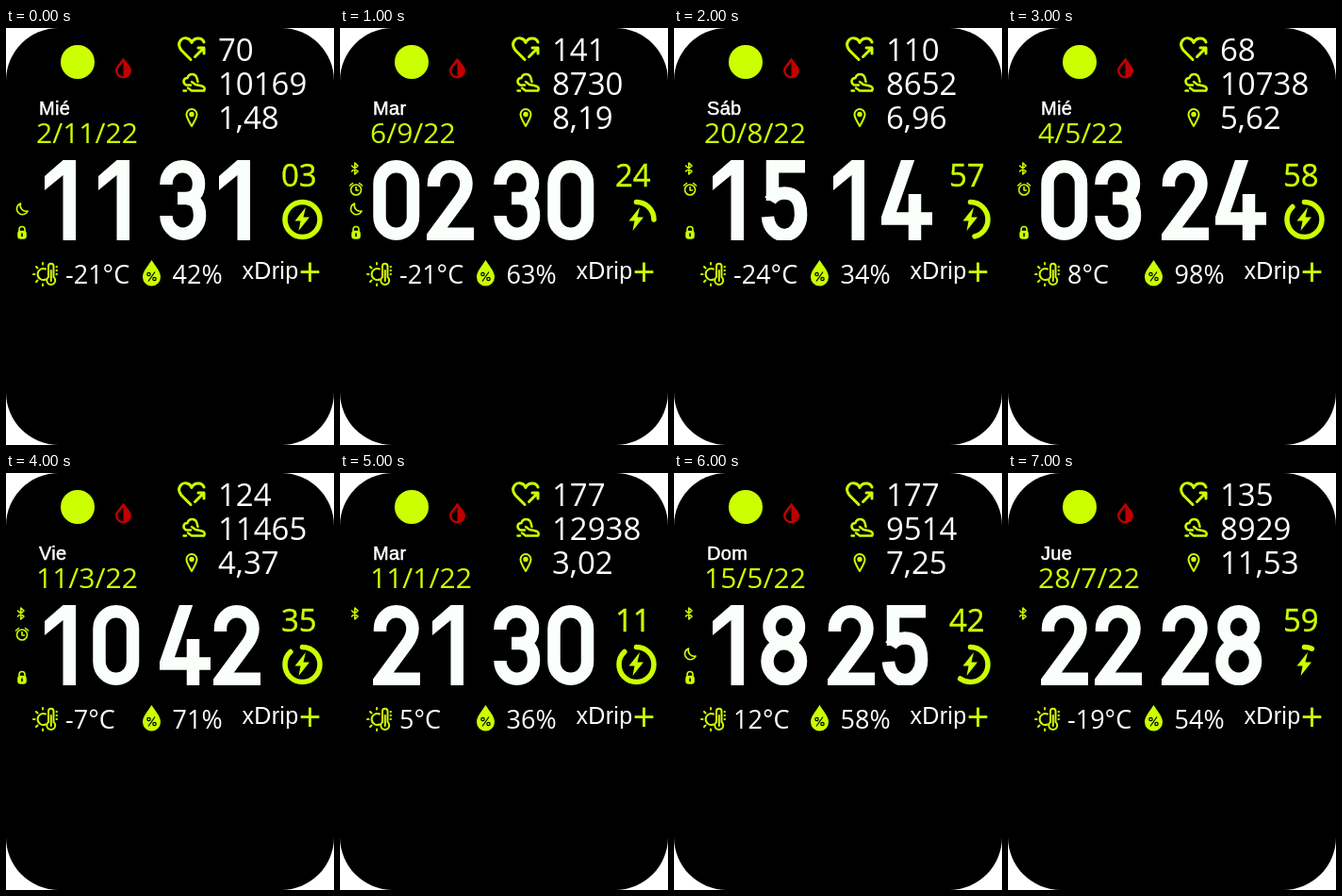
An HTML page that plays this animation: 348 by 442 pixels, repeating every 8000 ms.

```html
<!DOCTYPE html>
<html lang="es">
<head>
<meta charset="utf-8">
<title>Watch face</title>
<style>
  html, body { margin: 0; width: 100%; height: 100%; overflow: hidden; background: #fff; }
  svg { display: block; }
  text { fill: #fff; font-family: "Open Sans", "Noto Sans", sans-serif; }
  .arial { font-family: "Liberation Sans", Arial, sans-serif; letter-spacing: .3px; }
  .lime { fill: #cf0; }
  .stat { font-size: 33px; }
  .small { font-size: 27px; }
  .line { fill: none; stroke: #cf0; stroke-width: 2; stroke-linecap: round; stroke-linejoin: round; }
  .digit { fill: none; stroke: #fbfffb; stroke-width: 13.5; }
  .digit.solid { fill: #fbfffb; stroke: none; }
  #day { stroke: #fff; stroke-width: .5; }
  #seconds { stroke: #cf0; stroke-width: .4; }
  #ring { stroke-width: 5.5; }
</style>
</head>
<body>
<svg width="348" height="442" viewBox="0 0 348 442">
  <rect width="348" height="442" rx="56"/>
  <circle class="lime" cx="76" cy="36" r="18"/>

  <!-- red drop -->
  <path d="M124.5 31.500C121 37 116 41 116 45A8.500 8.500 0 0 0 133 45C133 41 128 37 124.500 31.500Z" fill="#c00000"/>
  <path d="M124.500 36C122 40 118.500 42 118.500 45.500A6 6 0 0 0 124.500 51Z"/>

  <!-- heart, steps, distance -->
  <g class="line">
    <path stroke-width="3" style="stroke-width:3" d="M196 33.500L186 23.500C180 16 187 9 192 11Q196 12 197 15.500Q199 11 204 11Q208.500 11 210 15M200.500 30.500L209.500 21.500M204 21H210V27"/>
    <path style="stroke-width:2.500" d="M196 60.500H191C187 58 188 53 192.500 53C194 47.500 201 48 202.500 53L203.500 57M197 57L201 60L206 61C211 62 211.500 64 210 66.500H197L193 63.500M188.500 66.500H191"/>
    <path d="M197 104C193.500 98 191.500 95 191.500 91.500A5.500 5.500 0 0 1 202.500 91.500C202.500 95 200.500 98 197 104Z"/>
  </g>
  <circle class="lime" cx="197" cy="91.500" r="2.700"/>

  <!-- status icons -->
  <g class="line" style="stroke-width:1.600">
    <path id="b" d="M12.500 146L19 152L15.800 155V143L19 146L12.500 152"/>
    <path id="a" d="M11.500 171.500a5.500 5.500 0 1 0 11 0a5.500 5.500 0 1 0 -11 0M17 168.500V172H19.500M10.500 167L13.500 164.500M23.500 167L20.500 164.500"/>
    <path id="m" d="M15.500 186A6 6 0 1 0 23 194A6.200 6.200 0 0 1 15.500 186Z"/>
    <g id="l">
      <path d="M14 216V213.500A3 3 0 0 1 20 213.500V216"/>
      <rect class="lime" x="13" y="215.500" width="8" height="7.500" rx="2.500"/>
      <path d="M17 218V220.500" stroke="#000"/>
    </g>
  </g>

  <!-- battery -->
  <path class="lime" d="M318 190L306.500 204.500H312.500L310.500 215L322 200.500H315.500Z"/>
  <circle id="ring" class="line" cx="314.500" cy="203" r="18.500" pathLength="100" transform="rotate(-90 314.500 203)"/>

  <!-- weather -->
  <g class="line">
    <path d="M42 255.500A6 6 0 1 0 42 266.500M29 261H30.500M32 253L33.500 254.500M32 269L33.500 267.500M39 249V250.500M39 271.500V273"/>
    <path d="M45 264V252.500A2.700 2.700 0 0 1 50.500 252.500V264A4.500 4.500 0 1 1 45 264ZM47.800 257V268M53.500 253H54M53.500 257H54M53.500 261H54"/>
  </g>
  <path class="lime" d="M154.500 246C150 253 145 258 145 264A9.500 9.500 0 0 0 164 264C164 258 159 253 154.500 246Z"/>
  <g fill="none" stroke="#000" stroke-width="1.200">
    <path d="M158 258.500L151 268.500"/>
    <circle cx="151.500" cy="261" r="1.700"/><circle cx="157.500" cy="266" r="1.700"/>
  </g>

  <text id="pulse" class="stat" x="225" y="35"></text>
  <text id="steps" class="stat" x="225" y="71"></text>
  <text id="km" class="stat" x="225" y="107"></text>
  <text id="day" class="arial" font-size="20" x="35" y="92"></text>
  <text id="date" class="lime" font-size="30" x="32" y="121.500"></text>
  <text id="seconds" class="stat lime" x="292" y="167.500"></text>
  <text id="temp" class="small" x="63" y="270.500"></text>
  <text id="humidity" class="small" x="176.500" y="270.500"></text>
  <text class="arial" font-size="25" x="250.500" y="266">xDrip</text>
  <text class="lime" font-size="42" x="322.500" y="273.500" text-anchor="middle">+</text>
</svg>
<script>
const glyphs = {
  0: 'M7 25A17.75 18.25 0 0 1 42.5 25V60A17.75 18.25 0 0 1 7 60Z',
  1: 'M39 0V85H25.5V16L6 32V17L25.5 0Z',
  2: 'M7.5 28V25A17.25 18.25 0 0 1 42 25Q42 33 36 41L8.5 78.25H50',
  3: 'M7 26V25A17.25 18.25 0 0 1 41.5 25Q41.5 40 28 40.5H19M28 40.5Q42.5 41 42.5 59A17.75 19.25 0 0 1 7 59',
  4: 'M31.5 -10L6.5 62H54M35.5 36V85',
  5: 'M47 6.75H12.5V43M10 43Q15 35 25 35Q42.5 35 42.5 57A17.5 21 0 0 1 7.5 60',
  8: 'M9 23.25A15.75 16.5 0 0 1 40.5 23.25A15.75 16.5 0 0 1 9 23.25ZM7 59.5A17.75 18.75 0 0 1 42.5 59.5A17.75 18.75 0 0 1 7 59.5Z'
};

// icons: b = bluetooth, a = alarm, m = moon, l = lock
const fields = ['day', 'date', 'time', 'seconds', 'pulse', 'steps', 'km', 'temp', 'humidity', 'battery', 'icons'];
const states = [
  'Mié 2/11/22 1131 03 70 10169 1,48 -21°C 42% 100 ml',
  'Mar 6/9/22 0230 24 141 8730 8,19 -21°C 63% 25 baml',
  'Sáb 20/8/22 1514 57 110 8652 6,96 -24°C 34% 46 bal',
  'Mié 4/5/22 0324 58 68 10738 5,62 8°C 98% 88 bal',
  'Vie 11/3/22 1042 35 124 11465 4,37 -7°C 71% 88 bal',
  'Mar 11/1/22 2130 11 177 12938 3,02 5°C 36% 88 b',
  'Dom 15/5/22 1825 42 177 9514 7,25 12°C 58% 60 bml',
  'Jue 28/7/22 2228 59 135 8929 11,53 -19°C 54% 7 b'
].map(row => Object.fromEntries(row.split(' ').map((value, i) => [fields[i], value])));

const $ = id => document.getElementById(id);
const addNode = (name, parent, attributes = {}) => {
  const node = document.createElementNS('http://www.w3.org/2000/svg', name);
  for (const key in attributes) node.setAttribute(key, attributes[key]);
  return parent.appendChild(node);
};
const face = document.querySelector('svg');
const digits = [35, 92, 163, 220].map(x =>
  addNode('path', addNode('svg', face, { x, y: 140, width: 55, height: 85 })));

function show(state) {
  for (const id of fields) if ($(id)) $(id).textContent = state[id];
  digits.forEach((path, i) => {
    const digit = state.time[i];
    path.setAttribute('d', glyphs[digit]);
    path.setAttribute('class', digit === '1' ? 'digit solid' : 'digit');
  });
  for (const id of 'baml') $(id).style.display = state.icons.includes(id) ? '' : 'none';
  $('ring').style.strokeDasharray = `${state.battery} 100`;
}

let shown;
function tick() {
  const index = Math.floor(performance.now() / 1000) % states.length;
  if (index !== shown) show(states[shown = index]);
  requestAnimationFrame(tick);
}
tick();
</script>
</body>
</html>
```
